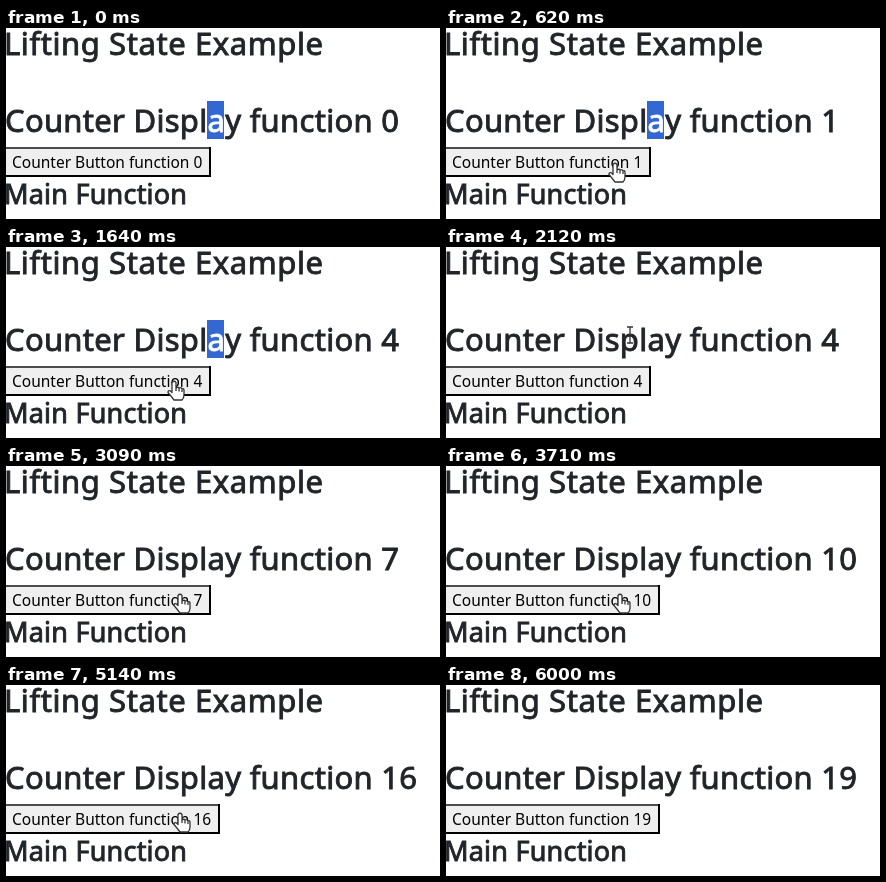
Animation of 434 by 191 pixels, one loop 6200 ms. Source, as an HTML page:

```html
<!DOCTYPE html>
<html lang="en">
<head>
<meta charset="utf-8">
<title>Lifting State Example</title>
<style>
  html, body { margin: 0; width: 100%; height: 100%; overflow: hidden; background: #fff; }
  svg { display: block; }
  text { font-family: "Noto Sans", "Open Sans", sans-serif; fill: #212529; }
  /* a thin outline gives the headings a medium weight */
  .h2, .h3 { stroke: #212529; stroke-width: .9px; }
  .h2 { font-size: 31px; letter-spacing: .29px; }
  .h3 { font-size: 27px; letter-spacing: .22px; }
  .wide { letter-spacing: .59px; }
  .selected { fill: #fff; stroke: #fff; }
  .label { font-size: 15.5px; fill: #000; }
  .edge { fill: none; stroke-width: 2; }
  .cursor { fill: #fff; stroke: #333; stroke-width: 1.3; stroke-linejoin: round; }
</style>
</head>
<body>
<svg width="434" height="191" viewBox="0 0 434 191">
  <text class="h2 wide" x="-2" y="27">Lifting State Example</text>
  <rect id="mark" x="201" y="73" width="17" height="38" fill="#3367d1"/>
  <text class="h2" x="-1" y="104">Counter Displ<tspan id="marked">a</tspan>y function <tspan id="total"></tspan></text>
  <rect id="face" y="119" height="30" fill="#efefef"/>
  <path id="top" class="edge"/>
  <path id="bottomRight" class="edge"/>
  <text class="label" x="6" y="140" id="label"></text>
  <text class="h3" x="-2" y="176">Main Function</text>
  <path id="cursor" class="cursor"/>
</svg>
<script>
const LOOP = 6200, SHOW = 120, HIDE = 5790, DESELECT = 2020, PRESS = 80;

const bursts = [
  { first: 620, clicks: 4, every: 340 },
  { first: 2590, clicks: 12, every: 208 },
  { first: 5250, clicks: 3, every: 180 }
];
const releases = bursts.flatMap(b =>
  Array.from({ length: b.clicks }, (_, i) => b.first + i * b.every));

const entry = { x: 215, y: 195 };
const moves = [
  { from: 120, to: 700, x: 168, y: 134 },
  { from: 1700, to: 2020, x: 184, y: 88 },
  { from: 2250, to: 2500, x: 174, y: 128 },
  { from: 5650, to: 5790, x: 176, y: 164 }
];

const shapes = {
  hand: "M-2 1.5Q0-1 2 1.5V7Q4 5.5 5 7Q7 6 8 8Q10 7 10 9.5V14Q10 17 8 19H0Q-3 15-6 11.5Q-6 9-3.5 10L-2 11.5Z" +
        "M2 7V10M5 7.5V10.5M8 8.5V11",
  beam: "M-3-8H3M0-8V8M-3 8H3",
  arrow: "M0 0V14L3.5 11 6 16 8 15 5.5 10H10Z"
};

const $ = id => document.getElementById(id);
const set = (id, attrs) => {
  for (const key in attrs) $(id).setAttribute(key, attrs[key]);
};
const visibility = on => on ? "visible" : "hidden";

function pointerAt(t) {
  let { x, y } = entry;
  for (const move of moves) {
    const k = Math.min(1, Math.max(0, (t - move.from) / (move.to - move.from)));
    const eased = k * (2 - k);
    x += (move.x - x) * eased;
    y += (move.y - y) * eased;
  }
  return [Math.round(x), Math.round(y)];
}

function draw(t) {
  const count = releases.filter(r => t >= r).length;
  const pressed = releases.some(r => t >= r - PRESS && t < r);
  const selected = t < DESELECT;
  const right = count > 9 ? 214 : 205;
  const [light, dark] = ["#4c4c4c", "#000"];

  $("total").textContent = count;
  $("label").textContent = "Counter Button function " + count;
  set("mark", { visibility: visibility(selected) });
  $("marked").classList.toggle("selected", selected);

  set("face", { width: right });
  set("top", { d: `M0 120H${right}`, stroke: pressed ? dark : light });
  set("bottomRight", { d: `M0 148H${right - 1}V119`, stroke: pressed ? light : dark });

  const [x, y] = pointerAt(t);
  const shape = y < 119 ? "beam" : y < 149 ? "hand" : "arrow";
  set("cursor", {
    d: shapes[shape],
    transform: `translate(${x} ${y})`,
    visibility: visibility(t >= SHOW && t < HIDE)
  });
}

const start = performance.now();
function tick() {
  draw((performance.now() - start) % LOOP);
  requestAnimationFrame(tick);
}
tick();
</script>
</body>
</html>
```
